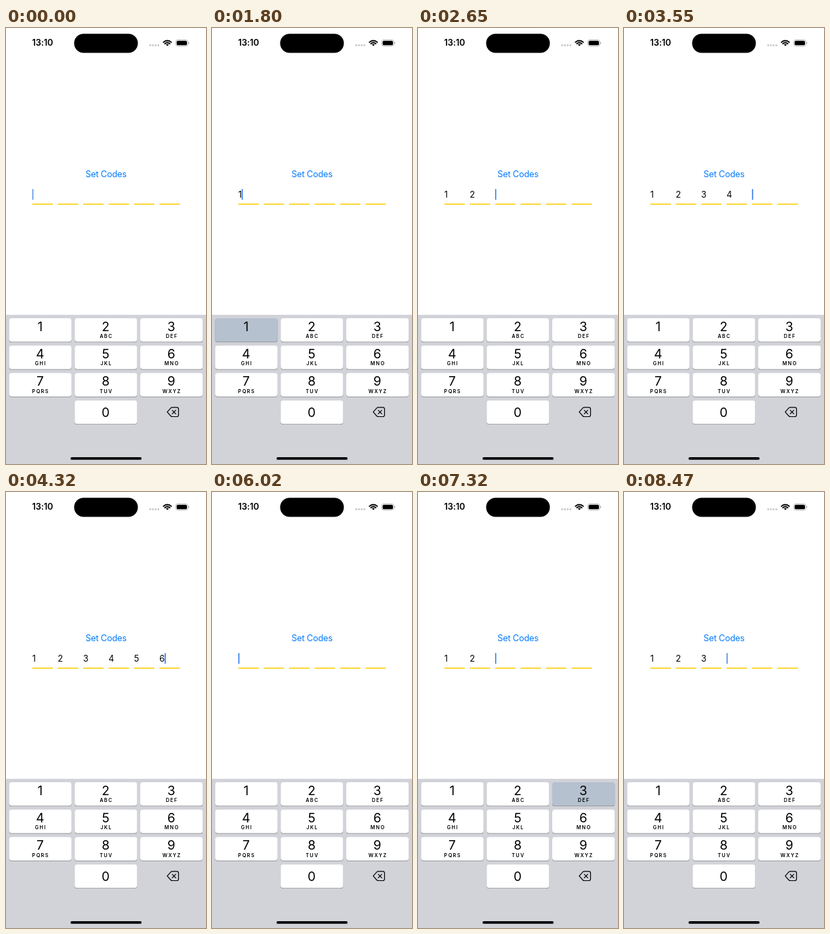
Animation of 295 by 640 pixels, one loop 8490 ms. Source, as an HTML page with a canvas:

```html
<!DOCTYPE html>
<html lang="en">
<head>
<meta charset="utf-8">
<title>Set Codes</title>
<style>
  html, body { margin: 0; width: 100%; height: 100%; overflow: hidden; background: #fff; }
  canvas { display: block; width: 295px; height: 640px; }
</style>
</head>
<body>
<canvas id="stage"></canvas>
<script>
const W = 295, H = 640, LOOP = 8490;
const FONT = 'Inter, "Liberation Sans", sans-serif';
const canvas = document.getElementById('stage');
const ctx = canvas.getContext('2d');
const dpr = window.devicePixelRatio || 1;
canvas.width = W * dpr;
canvas.height = H * dpr;

const CODE = '123456';
const LETTERS = ['', 'ABC', 'DEF', 'GHI', 'JKL', 'MNO', 'PQRS', 'TUV', 'WXYZ'];

// [start ms, digits entered, pressed key, caret opacity, caret still after the last digit]
const STEPS = [
  [0, 0, '', 0.8],
  [290, 0, 'del'],
  [410, 0, ''],
  [950, 0, '', 0.6],
  [1080, 0, '', 0.2],
  [1210, 0, '', 0],
  [1400, 0, '', 0.5],
  [1600, 0, '1'],
  [1800, 1, '1', 1, true],
  [2110, 1, ''],
  [2290, 1, '2'],
  [2470, 2, '3'],
  [2650, 2, ''],
  [3170, 3, '4'],
  [3370, 4, ''],
  [3560, 4, '5'],
  [3760, 5, ''],
  [3960, 5, '6'],
  [4320, 6, '', 1, true],
  [4720, 5, ''],
  [4920, 4, ''],
  [5110, 3, ''],
  [5310, 2, ''],
  [5500, 1, ''],
  [5890, 0, 'del'],
  [6020, 0, ''],
  [6510, 0, '1'],
  [6670, 1, '1', 1, true],
  [6830, 1, ''],
  [6990, 1, '2'],
  [7150, 2, ''],
  [7320, 2, '3'],
  [7470, 2, ''],
  [7990, 3, '', 1, true],
  [8150, 3, ''],
  [8470, 3, '', 0.85]
];

function box(x, y, w, h, r, color) {
  ctx.fillStyle = color;
  ctx.beginPath();
  ctx.roundRect(x, y, w, h, r);
  ctx.fill();
}

function label(str, x, y, size, { weight = 400, color = '#000', align = 'center', spacing = 0 } = {}) {
  ctx.font = `${weight} ${size}px ${FONT}`;
  ctx.letterSpacing = spacing + 'px';
  ctx.textAlign = align;
  ctx.fillStyle = color;
  ctx.fillText(str, x, y);
}

function drawWifi(x, y) {
  const from = -Math.PI * 0.75, to = -Math.PI * 0.25;
  ctx.strokeStyle = ctx.fillStyle = '#000';
  ctx.lineWidth = 1.9;
  for (const r of [8.1, 5.1]) {
    ctx.beginPath();
    ctx.arc(x, y, r, from, to);
    ctx.stroke();
  }
  ctx.beginPath();
  ctx.moveTo(x, y);
  ctx.arc(x, y, 3, from, to);
  ctx.fill();
}

function drawStatusBar() {
  label('13:10', 54, 26.4, 12.75, { weight: 600, spacing: -0.1 });
  box(100.5, 8.5, 94, 28, 14, '#000');
  for (let i = 0; i < 4; i++) box(211.3 + i * 4, 24, 2.8, 2.8, 1.4, '#c6c6c8');
  drawWifi(238, 26.6);
  ctx.strokeStyle = '#a8a8aa';
  ctx.lineWidth = 0.8;
  ctx.beginPath();
  ctx.roundRect(250.4, 17.4, 17.8, 9.2, 3);
  ctx.stroke();
  box(251.7, 18.7, 15.2, 6.6, 1.9, '#000');
  box(269, 20.5, 1.1, 3, 0.6, '#a8a8aa');
}

function drawField([, count, , alpha = 1, held]) {
  label('Set Codes', 147.5, 218.6, 12.75, { color: '#007aff', spacing: -0.2 });
  const left = i => 38.8 + i * 37.5;
  for (let i = 0; i < 6; i++) {
    box(left(i), 257.8, 30.2, 1.6, 0, '#ffcc00');
    if (i < count) label(CODE[i], left(i), 249, 12.75, { align: 'left' });
  }
  const x = held ? left(count - 1) + ctx.measureText(CODE[count - 1]).width - 0.2 : left(count);
  ctx.globalAlpha = alpha;
  box(x, 236.2, 1.6, 16.2, 0.8, '#2f78e8');
  ctx.globalAlpha = 1;
}

function drawDelete(filled) {
  ctx.lineWidth = 1.2;
  ctx.lineJoin = ctx.lineCap = 'round';
  ctx.strokeStyle = ctx.fillStyle = '#000';
  ctx.beginPath();
  ctx.moveTo(237.8, 563.7);
  ctx.lineTo(243, 557.9);
  ctx.quadraticCurveTo(244, 556.9, 245.3, 556.9);
  ctx.lineTo(252, 556.9);
  ctx.quadraticCurveTo(254.5, 556.9, 254.5, 559.4);
  ctx.lineTo(254.5, 568);
  ctx.quadraticCurveTo(254.5, 570.5, 252, 570.5);
  ctx.lineTo(245.3, 570.5);
  ctx.quadraticCurveTo(244, 570.5, 243, 569.5);
  ctx.closePath();
  ctx.stroke();
  if (filled) ctx.fill();
  ctx.strokeStyle = filled ? '#d1d3d9' : '#000';
  ctx.beginPath();
  ctx.moveTo(245.2, 561.1);
  ctx.lineTo(250.4, 566.3);
  ctx.moveTo(250.4, 561.1);
  ctx.lineTo(245.2, 566.3);
  ctx.stroke();
}

function drawKey(digit, col, row, pressed) {
  const x = 4.5 + col * 96.75, y = 426 + row * 40.25, mid = x + 46.1;
  box(x, y + 0.8, 92.25, 34.5, 3.9, '#898a8d');
  box(x, y, 92.25, 34.5, 3.9, pressed ? '#b5c1ce' : '#fff');
  label(digit, mid - 0.4, y + (digit === '0' ? 24.2 : 18.8), 18.75);
  if (digit !== '0') label(LETTERS[digit - 1], mid + 0.6, y + 29.2, 7.2, { weight: 600, spacing: 1.4 });
}

function drawKeyboard(pressed) {
  box(0, 421, W, H - 421, 0, '#d1d3d9');
  for (let n = 1; n <= 9; n++) drawKey(String(n), (n - 1) % 3, Math.floor((n - 1) / 3), pressed === String(n));
  drawKey('0', 1, 3, false);
  drawDelete(pressed === 'del');
  box(95.2, 630, 104.8, 3.8, 1.9, '#000');
}

function render(time) {
  const step = STEPS.findLast(s => s[0] <= time);
  ctx.setTransform(dpr, 0, 0, dpr, 0, 0);
  box(0, 0, W, H, 0, '#fff');
  drawStatusBar();
  drawField(step);
  drawKeyboard(step[2]);
}

const start = performance.now();
function tick() {
  render((performance.now() - start) % LOOP);
  requestAnimationFrame(tick);
}
tick();
</script>
</body>
</html>
```
